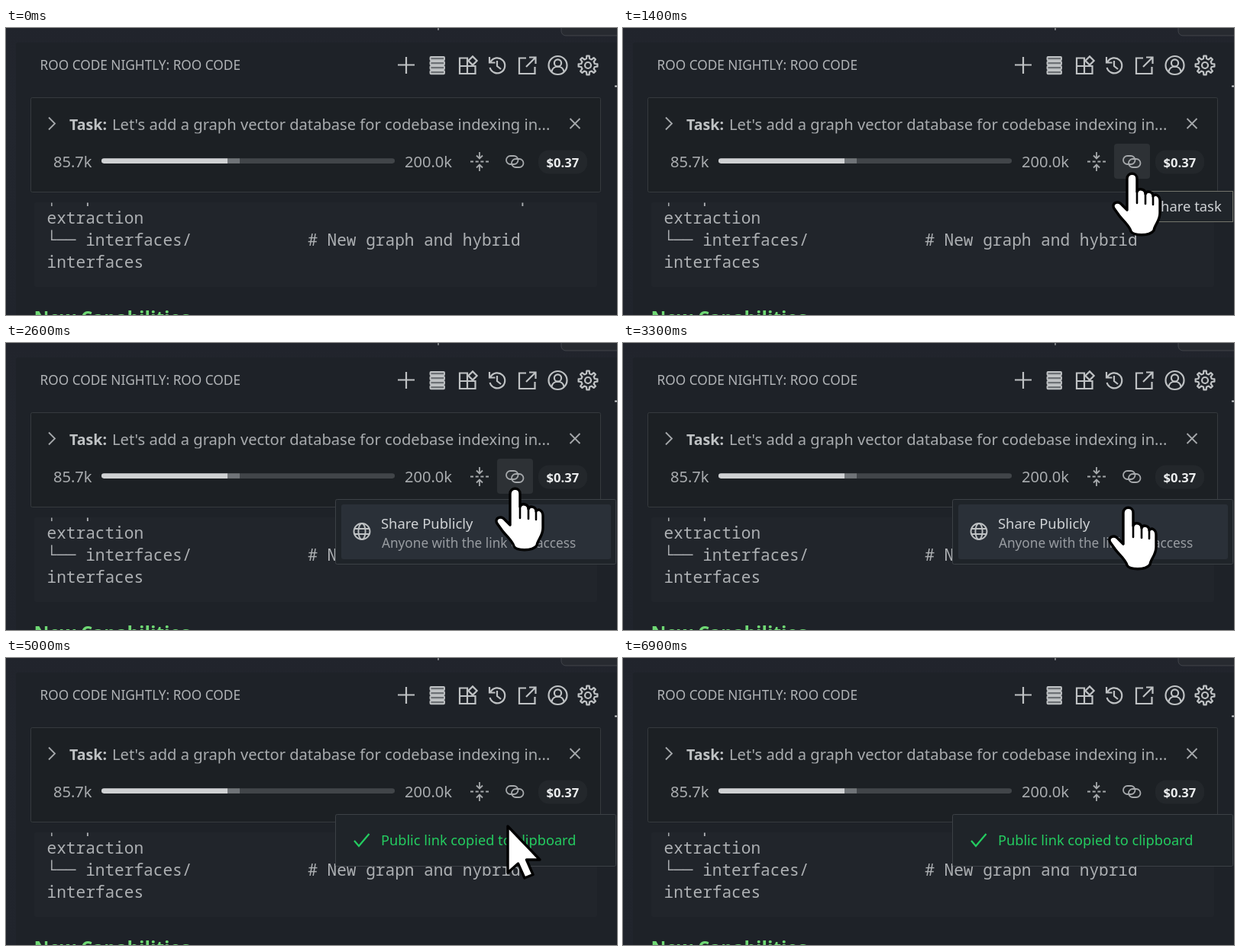
An HTML page that plays this animation: 800 px wide and 377 px high, repeating every 7 s.

```html
<!DOCTYPE html>
<html lang="en">
<head>
<meta charset="utf-8">
<title>Share task</title>
<style>
  html, body { margin: 0; width: 100%; height: 100%; overflow: hidden; background: #20242b; }
  svg { display: block; width: 100vw; height: 100vh; }
  text { font-family: "Noto Sans", "Open Sans", sans-serif; white-space: pre; }
  .code text { font: 21.1px "Noto Sans Mono", "DejaVu Sans Mono", monospace; fill: #adb0b3; }
  .body { font-size: 20.1px; fill: #a9acaf; }
  .menu { font-size: 18.4px; fill: #d0d3d6; }
  .done { font-weight: 500; font-size: 18.2px; fill: #24cc60; }
  .line { fill: none; stroke: #bfc2c4; stroke-width: 2.2; }
  .thin { stroke-width: 1.9; }
  .soft { fill: none; stroke: #a6a9ac; stroke-width: 1.8; }
  .cursor path { fill: #fff; stroke: #000; stroke-width: 3.4; stroke-linejoin: round; }
</style>
</head>
<body>
<svg viewBox="0 0 800 377" preserveAspectRatio="none">
  <defs>
    <linearGradient id="edge" x2="0" y2="1">
      <stop offset="0" stop-color="#21242c"/>
      <stop offset=".3" stop-color="#22262e"/>
      <stop offset="1" stop-color="#20242c"/>
    </linearGradient>
    <clipPath id="codeClip"><rect x="37" y="229.5" width="737" height="111"/></clipPath>
    <clipPath id="taskClip"><rect x="80" y="108" width="640" height="30.5"/></clipPath>
  </defs>

  <rect width="800" height="377" fill="url(#edge)"/>
  <rect x="13" y="19" width="800" height="370" rx="3" fill="#1e2228"/>
  <rect x="727" y="-12" width="90" height="22" rx="6" fill="#272a30" stroke="#42454b"/>
  <path d="M566 0v3" stroke="#777a7e" stroke-width="2"/>
  <path d="M797 76.5h3" stroke="#c8cacc" stroke-width="2"/>

  <text x="44.5" y="55" font-size="17.25" fill="#b1b4b7">ROO CODE NIGHTLY: ROO CODE</text>

  <g class="line">
    <path d="M524 38v22M513 48.5h22"/>
    <g id="server" fill="#6d7175"></g>
    <path d="M594 39.5h10v20.5h-10zM594 50h20.5v10H594"/>
    <rect x="607" y="39" width="8" height="8" transform="rotate(45 611 43)"/>
    <path d="M634.5 44.5A10 10 0 1 1 633.6 52M633 38v7.5h7.5M643 43v7l5 4"/>
    <path d="M681 39.5h-9V60h20.5V51M685 38.5h8.5V47M693 39L681 51"/>
    <circle cx="722.5" cy="49" r="12"/>
    <circle cx="722.5" cy="46" r="4.6"/>
    <path d="M714.5 57.5c1-9 15-9 16 0"/>
    <path id="gear" stroke-linejoin="round"/>
    <circle cx="762" cy="49" r="4"/>
  </g>

  <rect x="32.5" y="91.5" width="746" height="124" rx="2" fill="#1c2024" stroke="#363a3e"/>
  <path class="soft" d="M56 117.5l8 8-8 8M738.5 119l13 13m0-13l-13 13"/>
  <g class="body" clip-path="url(#taskClip)">
    <text x="83" y="134" font-size="19.6" font-weight="700" fill="#bfc2c4">Task:</text>
    <text x="139" y="134" font-size="20.15">Let's add a graph vector database for codebase indexing in...</text>
  </g>
  <g class="body">
    <text x="62" y="183">85.7k</text>
    <text x="522" y="183">200.0k</text>
  </g>
  <rect x="125" y="171.3" width="384" height="6.6" rx="3.3" fill="#414549"/>
  <path d="M290 171.3h16v6.6h-16z" fill="#707478"/>
  <path d="M290 171.3H128.3a3.3 3.3 0 0 0 0 6.6H290z" fill="#cfd1d3"/>

  <rect id="hover" x="643" y="152" width="47" height="46" rx="4" fill="#2d3135"/>
  <g class="soft">
    <path d="M608 175.5h24" stroke-dasharray="4 2.7"/>
    <path d="M620 163v8.5m-4-4l4 4 4-4M620 188v-8.5m-4 4l4-4 4 4"/>
    <rect x="655" y="168" width="15.5" height="11" rx="5.5"/>
    <rect x="662" y="172" width="15.5" height="11" rx="5.5"/>
  </g>
  <rect x="697" y="160.5" width="64" height="31" rx="14" fill="#23272b"/>
  <text x="707.5" y="183" font-size="16.6" font-weight="600" fill="#eceeef">$0.37</text>

  <rect x="37" y="229" width="737" height="111" rx="3" fill="#21252b"/>
  <g class="code" clip-path="url(#codeClip)">
    <text x="53.5" y="228.5">├── processors/            # Enhanced relationship</text>
    <text x="53.5" y="257">extraction</text>
    <text x="53.5" y="286">└── interfaces/            # New graph and hybrid</text>
    <text x="53.5" y="315">interfaces</text>
  </g>
  <text x="36.5" y="389.6" font-size="24.5" font-weight="700" fill="#6fd874">New Capabilities</text>

  <g id="tip">
    <rect x="680.5" y="214.5" width="118" height="40" fill="#20252a" stroke="#74756c"/>
    <text class="menu" x="694" y="241" fill="#c0c3c5">Share task</text>
  </g>

  <g id="popup">
    <rect x="431.5" y="205.5" width="367" height="85" rx="2" fill="#1f2429" stroke="#3c4146"/>
    <rect x="439" y="212" width="353" height="72" rx="3" fill="#2a3038"/>
    <g class="line thin">
      <circle cx="466" cy="247.5" r="10.5"/>
      <ellipse cx="466" cy="247.5" rx="4.6" ry="10.5"/>
      <path d="M456 244h20M456 251h20"/>
    </g>
    <text class="menu" x="491" y="243.5">Share Publicly</text>
    <text x="492" y="269" font-size="17.2" fill="#989ca1">Anyone with the link can access</text>
  </g>

  <g id="toast">
    <rect x="431.5" y="205.5" width="367" height="68" rx="2" fill="#1f2429" stroke="#3c4146"/>
    <path d="M456 240l6 7 13.5-16" fill="none" stroke="#24cc60" stroke-width="2.2"/>
    <text class="done" x="491" y="246">Public link copied to clipboard</text>
  </g>

  <g id="cursor" class="cursor">
    <path id="arrow" d="M2 3V64L15.500 52L24 71L35 66.500L26.500 47H44Z"/>
    <g id="hand">
      <path d="M-6 8C-6 -1 7 -1 7 8V25C9 20 18 21 18 28C20 23 28 25 28 31C31 27 37 30 37 37V53C37 64 30 68 29 76C23 84 2 83 -1 77C-3 69 -13 62 -18 54L-23 47C-27 40 -18 36 -13 42L-6 49Z"/>
      <path d="M7 25V40M18 28V41M28 31V42" stroke-linecap="round" style="fill:none;stroke-width:2.6"/>
    </g>
  </g>
</svg>
<script>
  const LOOP = 7000, STEP = 100;
  const $ = id => document.getElementById(id);

  // Pointer stops: time, x, y
  const path = [
    [200, 716, 400], [900, 667, 195], [1100, 666, 190], [3000, 666, 190],
    [3300, 661, 215], [3600, 656, 219], [4100, 655, 218], [6200, 655, 218], [6800, 704, 400]
  ];
  // Visible span of each part
  const spans = {
    hover: [900, 3100], tip: [1300, 2000], popup: [2000, 4500], toast: [4500, LOOP],
    cursor: [200, 6800], hand: [900, 4100]
  };

  $('server').innerHTML = [38, 44, 50, 56].map(y =>
    `<rect x="555.5" y="${y}" width="18.5" height="4.3" rx="1" stroke-width="1.9"/>`).join('');

  function gearPath(cx, cy, teeth, outer, inner) {
    const pts = [];
    for (let i = 0; i < teeth; i++) {
      [[-.29, inner], [-.17, outer], [.17, outer], [.29, inner]].forEach(([off, r]) => {
        const a = (i + off) / teeth * 2 * Math.PI;
        pts.push((cx + r * Math.cos(a)).toFixed(1) + ' ' + (cy + r * Math.sin(a)).toFixed(1));
      });
    }
    return 'M' + pts.join('L') + 'Z';
  }
  $('gear').setAttribute('d', gearPath(762, 49, 8, 12.5, 9));

  const ease = p => p * p * (3 - 2 * p);

  function pointer(t) {
    const i = path.findIndex(k => k[0] > t);
    if (i < 1) return path[i < 0 ? path.length - 1 : 0].slice(1);
    const [t0, x0, y0] = path[i - 1], [t1, x1, y1] = path[i];
    const p = ease((t - t0) / (t1 - t0));
    return [x0 + (x1 - x0) * p, y0 + (y1 - y0) * p];
  }

  function show(id, on) { $(id).style.display = on ? '' : 'none'; }

  function draw(t) {
    for (const id in spans) show(id, t >= spans[id][0] && t < spans[id][1]);
    show('arrow', t < spans.hand[0] || t >= spans.hand[1]);
    const [x, y] = pointer(t);
    $('cursor').setAttribute('transform', `translate(${x.toFixed(1)} ${y.toFixed(1)})`);
  }

  const start = performance.now();
  function tick() {
    const t = (performance.now() - start) % LOOP;
    draw(Math.floor(t / STEP) * STEP);
    requestAnimationFrame(tick);
  }
  draw(0);
  requestAnimationFrame(tick);
</script>
</body>
</html>
```
